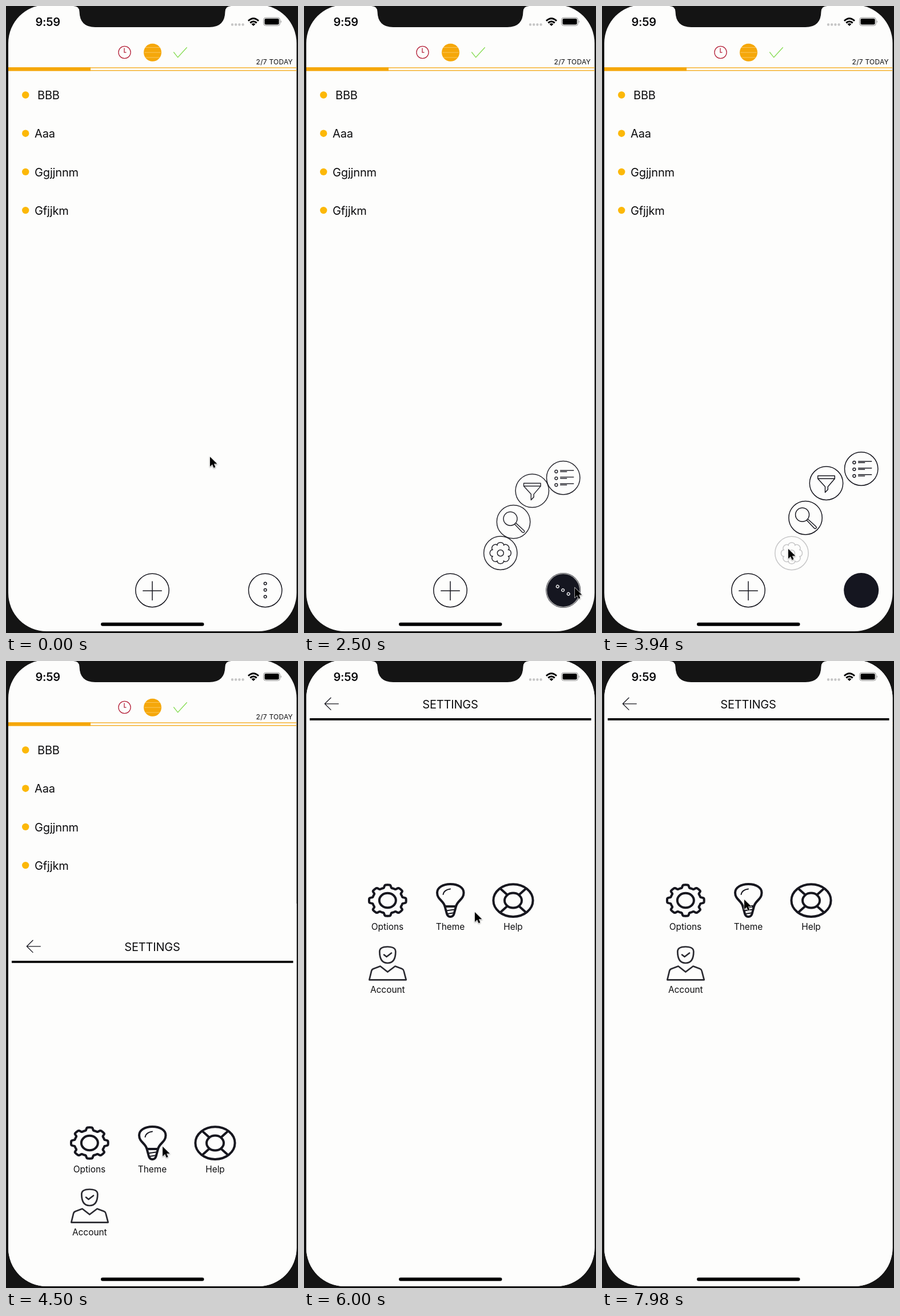
These frames come from a looping animation (511x1096 px, 8 s). An HTML page:

```html
<!DOCTYPE html>
<html lang="en">
<head>
<meta charset="utf-8">
<title>Task list</title>
<style>
html, body { margin: 0; width: 100%; height: 100%; overflow: hidden; background: #141414; }
svg { display: block; width: 511px; height: 1096px; }
text { font-family: Inter, Roboto, sans-serif; fill: #0c0c0e; }
.line { fill: none; stroke: #17171f; stroke-linecap: round; stroke-linejoin: round; }
.thin { stroke-width: 1.5; }
.item { font-size: 20px; letter-spacing: -.15px; }
.label { font-size: 15.4px; text-anchor: middle; }
.bg { fill: #fdfdfc; }
#cursor { filter: drop-shadow(0 1.5px 1.2px #0006); }
</style>
</head>
<body>
<svg viewBox="0 0 511 1096">
  <defs>
    <clipPath id="screen"><rect x="4" y="-2" width="504.5" height="1095" rx="67"/></clipPath>
  </defs>
  <g clip-path="url(#screen)">
    <rect class="bg" width="511" height="1096"/>

    <g id="home">
      <g fill="none" stroke-width="1.3">
        <g stroke="#b5243c"><circle cx="207.5" cy="81" r="10.6"/><path d="M207 73.5V81.2H210.5"/></g>
        <path d="M293.3 80.5L300.7 89.8L316.7 72.2" stroke="#86dc52"/>
      </g>
      <circle cx="256.5" cy="81.2" r="15.5" fill="#f5a70a"/>
      <path d="M244 72.5H269M242 81.2H271M244 90H269" stroke="#fbc75f"/>
      <path d="M4 108H509M4 112.7H509" stroke="#f6b22f" stroke-width="1.5"/>
      <rect x="4" y="107.2" width="144" height="6.2" fill="#f5a70a"/>
      <text x="502" y="102" text-anchor="end" font-size="12" letter-spacing=".25">2/7 TODAY</text>
      <g id="list"></g>
      <g class="line thin">
        <circle cx="256" cy="1021.5" r="29.2"/>
        <path d="M239.8 1022.3H272.3M256 1006V1038.5"/>
      </g>

      <g id="menu">
        <g class="bubble">
          <circle class="bg" r="29.2"/>
          <path d="M-5-13H18M-5-10.7H6M-5-1.3H18M-5 1H6M-5 10.3H18M-5 12.6H6"/>
          <circle cx="-12.3" cy="-11" r="2.4"/><circle cx="-12.3" cy=".8" r="2.4"/><circle cx="-12.3" cy="12.5" r="2.4"/>
        </g>
        <g class="bubble">
          <circle class="bg" r="29.2"/>
          <path d="M-14.8-13H14.8V-8L2.8 6V11L-2 16V6L-14.8-8ZM-14.8-8H14.8"/>
        </g>
        <g class="bubble">
          <circle class="bg" r="29.2"/>
          <circle cx="-5.5" cy="-5.5" r="12"/>
          <path d="M2.5 4.5L15.8 18.5Q18.2 19.5 19 17.5Q19.5 15.8 18 14.8L4.5 2.5"/>
        </g>
        <g class="bubble">
          <circle class="bg" r="29.2"/>
          <path id="flower"/>
          <circle r="5.5"/>
        </g>
      </g>

      <g transform="translate(453.7 1021.5)">
        <circle id="disc" r="30.5" fill="#151620"/>
        <circle id="ring" class="line thin" r="29.2"/>
        <g id="dots" class="line thin"><circle cy="-12" r="2.3"/><circle cy="-.7" r="2.3"/><circle cy="11" r="2.3"/></g>
      </g>
    </g>

    <g id="settings">
      <rect class="bg" width="511" height="1096"/>
      <path class="line" stroke-width="1.3" d="M60.3 74.8H36.3M47 64.3L36.3 74.8L47 85.4"/>
      <text x="256" y="83" font-size="20" letter-spacing="-.2" text-anchor="middle">SETTINGS</text>
      <rect x="10" y="100" width="492.5" height="3.8"/>
      <g class="line" stroke-width="4">
        <g transform="translate(146.3 418.5)"><path id="gear"/><ellipse rx="14.5" ry="12.7"/></g>
        <path d="M246.5 429C244.5 419 233 417 233 405C233 396 243 390 256.3 390C269.5 390 279.5 396 279.5 405C279.5 417 268 419 266 429ZM246.5 429L250 442Q251.5 447 256.3 447Q261 447 262.5 442L266 429"/>
        <path stroke-width="2" d="M243.5 408Q245 400 256 398.5M248.5 436.5L264 434.3M250.5 442L262 440.3"/>
        <ellipse cx="366" cy="418.6" rx="34.6" ry="28.3"/>
        <ellipse cx="366" cy="418.6" rx="15" ry="13"/>
        <path d="M343.5 397.7L355.5 408.5M388.5 397.7L376.5 408.5M343.5 439.5L355.5 428.7M388.5 439.5L376.5 428.7"/>
        <g stroke="#2a2a30" stroke-width="2.7">
          <path d="M146.3 499.5C153 499.5 160.3 501.5 160.3 508C160.3 520 156 528 146.3 528C136.600 528 132.300 520 132.300 508C132.300 501.500 139.500 499.500 146.300 499.500Z"/>
          <path d="M140 513.5L144.500 517L153 510.500M133.500 533.500L146.300 543.500L159.500 533.500L171.500 538Q174 539 174.700 542L178.700 557.300H114.300L118 542Q118.700 539 121.500 538Z"/>
        </g>
      </g>
      <g class="label">
        <text x="146" y="470">Options</text>
        <text x="256" y="470">Theme</text>
        <text x="366" y="470">Help</text>
        <text x="146.3" y="580">Account</text>
      </g>
    </g>

    <path d="M118 0Q128 0 128.500 10Q129 37 156 37H356Q383 37 383.500 10Q384 0 394 0Z" fill="#141414"/>
    <text x="51.5" y="35" font-size="20" font-weight="600" letter-spacing="-.2">9:59</text>
    <path d="M396 32.500H415" stroke="#c6c6c6" stroke-width="4.400" stroke-linecap="round" stroke-dasharray="0 6.200"/>
    <g fill="none" stroke="#000" stroke-width="3">
      <path d="M424 26Q433 17.500 442 26M427.300 29.500Q433 24.500 438.700 29.500"/>
    </g>
    <path d="M429.500 31.500Q433 28.800 436.500 31.500L433 35Z"/>
    <rect x="450.700" y="20.300" width="28.800" height="14" rx="4" fill="none" stroke="#888"/>
    <rect x="452.500" y="22" width="25.200" height="10.600" rx="2.300"/>
    <path d="M481 25Q483 27.300 481 29.800Z" fill="#888"/>
    <rect x="166" y="1077.700" width="180.500" height="6" rx="3"/>
  </g>
  <path id="cursor" d="M0 0V17L4 13.300L6.600 19.300L9.400 18.100L6.900 12.300H12.400Z" stroke="#fff" stroke-width="1.200" paint-order="stroke"/>
</svg>
<script>
const $ = id => document.getElementById(id);
const LOOP = 8000;
const clamp = (v, lo = 0, hi = 1) => Math.min(hi, Math.max(lo, v));
const ramp = (t, start, length) => clamp((t - start) / length);
const easeOut = u => 1 - (1 - u) ** 3;
const easeInOut = u => u * u * (3 - 2 * u);

// Closed outline from a radius function of the angle
function polar(radius, stretch = 1) {
  let d = '';
  for (let i = 0; i < 160; i++) {
    const a = i * Math.PI / 80, r = radius(a);
    d += `${i ? 'L' : 'M'}${(r * stretch * Math.cos(a)).toFixed(2)} ${(r * Math.sin(a)).toFixed(2)}`;
  }
  return d + 'Z';
}
$('flower').setAttribute('d', polar(a => 14.7 + 3.8 * Math.sqrt(Math.abs(Math.cos(4 * a)))));
$('gear').setAttribute('d', polar(a => 24.8 + 2.4 * clamp(2.5 * Math.cos(8 * a), -1, 1), 1.19));

$('list').innerHTML = ['BBB', 'Aaa', 'Ggjjnnm', 'Gfjjkm'].map((name, i) => {
  const y = 155.5 + i * 67.2;
  return `<circle cx="34.2" cy="${y}" r="6.2" fill="#fcb808"/>
    <text class="item" x="${i ? 50 : 55}" y="${y + 7.7}">${name}</text>`;
}).join('');

const bubbles = [...document.querySelectorAll('.bubble')];
bubbles.forEach(b => b.classList.add('line', 'thin'));
// Distance from the button and angle from vertical
const fan = [[212.5, 0], [197, 18.1], [160, 37.6], [138, 61.9]];

const route = [
  [0, 357, 788], [700, 357, 788], [1700, 474, 1017], [2900, 474, 1017],
  [3700, 326, 949], [4250, 326, 949], [4900, 170, 647], [5200, 170, 647],
  [6000, 299, 439], [6700, 299, 439], [7500, 249, 417], [8000, 249, 417]
];

function cursorAt(t) {
  const i = route.findIndex(k => k[0] > t);
  const [t0, x0, y0] = route[i - 1], [t1, x1, y1] = route[i];
  const u = easeInOut((t - t0) / (t1 - t0));
  return [x0 + (x1 - x0) * u, y0 + (y1 - y0) * u];
}

function draw(t) {
  const open = easeOut(ramp(t, 2150, 605));
  const press = ramp(t, 3780, 140) - ramp(t, 4080, 170);
  bubbles.forEach((b, i) => {
    const [dist, deg] = fan[i];
    const a = deg * (1 - .57 * (1 - open)) * Math.PI / 180;
    const x = 453.7 - dist * open * Math.sin(a), y = 1021.5 - dist * open * Math.cos(a);
    b.setAttribute('transform', `translate(${x} ${y})`);
    b.setAttribute('opacity', open * (i === 3 ? 1 - .77 * press : 1));
  });

  const fade = 1 - ramp(t, 2500, 350);
  const ink = t < 2150 ? '#17171f' : '#e4e4e6';
  $('disc').setAttribute('opacity', ramp(t, 2150, 150));
  $('ring').style.stroke = t < 2150 ? ink : '#aaa';
  $('dots').style.stroke = ink;
  $('ring').setAttribute('opacity', fade);
  $('dots').setAttribute('opacity', fade);
  $('dots').setAttribute('transform', `rotate(${-60 * open})`);

  const slide = 1096 * (1 - easeOut(ramp(t, 4250, 925)));
  $('settings').setAttribute('transform', `translate(0 ${slide})`);
  $('cursor').setAttribute('transform', `translate(${cursorAt(t)})`);
}

function tick(now) {
  draw(now % LOOP);
  requestAnimationFrame(tick);
}
draw(0);
requestAnimationFrame(tick);
</script>
</body>
</html>
```
